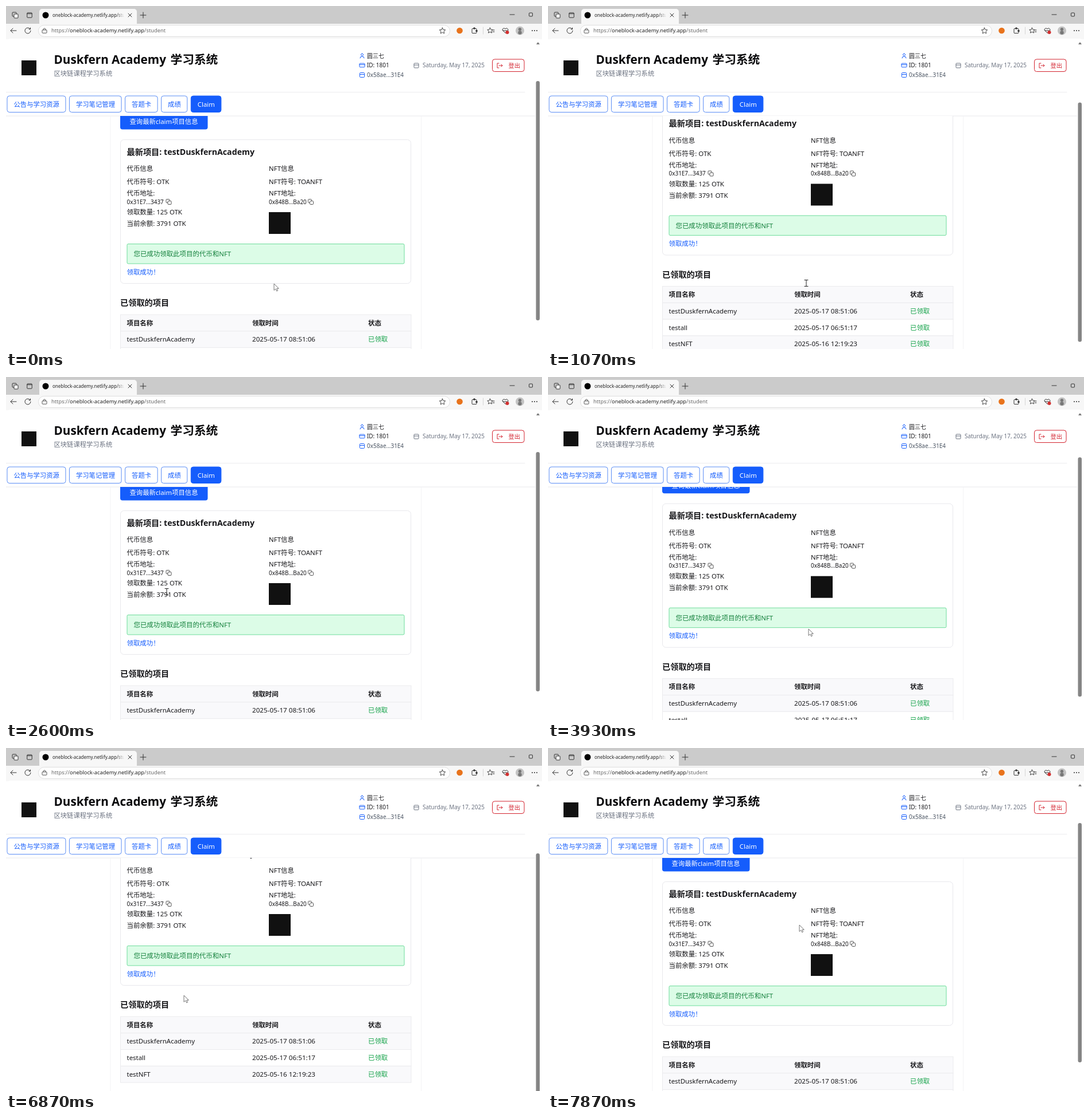
An HTML page for the animation above (8000 ms loop, 934 by 599 pixels).

```html
<!DOCTYPE html>
<html lang="zh">
<head>
<meta charset="utf-8">
<title>Student page</title>
<style>
  html, body { margin: 0; width: 100%; height: 100%; overflow: hidden; background: #fff; }
  svg { display: block; }
  text { font-family: "Noto Sans", "Noto Sans CJK SC", "Noto Sans CJK", sans-serif; white-space: pre; }
  .icon { fill: none; stroke-linecap: round; stroke-linejoin: round; }
</style>
</head>
<body>
<svg id="stage" width="934" height="599" viewBox="0 0 934 599"></svg>
<script>
const INK = '#18181b', BLUE = '#155dfc', GREY = '#6b7280', RED = '#d3232f', GREEN = '#16a34a', DARK = '#333';
const BASE = 11.45, HEAD = 14.2, SMALL = 9.95;

// y is the middle of the line
const text = (s, x, y, size = BASE, fill = INK, weight = 400) =>
  `<text x="${x}" y="${(y + size * .36).toFixed(2)}" font-size="${size}" fill="${fill}" font-weight="${weight}">${s}</text>`;
const box = (x, y, w, h, r, fill, stroke = 'none') =>
  `<rect x="${x}" y="${y}" width="${w}" height="${h}" rx="${r}" fill="${fill}" stroke="${stroke}"/>`;
const dot = (x, y, r, fill) => `<circle cx="${x}" cy="${y}" r="${r}" fill="${fill}"/>`;
const icon = (x, y, d, stroke = DARK) =>
  `<path class="icon" d="${d}" stroke="${stroke}" transform="translate(${x} ${y})"/>`;
const line = (x1, y1, x2, y2, stroke) => icon(0, 0, `M${x1} ${y1}L${x2} ${y2}`, stroke);

// Icons centred on x, y
const frame = (x, y, w, h, color = DARK, fill = 'none') => box(x - w / 2, y - h / 2, w, h, 1, fill, color);
const stacked = (x, y, size, color) =>
  frame(x - 1.5, y - 1.5, size, size, color) + frame(x + 1.5, y + 1.5, size, size, color, '#fff');
const card = (x, y, w, h, color) => frame(x, y, w, h, color) + line(x - w / 2, y - 1, x + w / 2, y - 1, color);
const person = (x, y, color) => icon(x, y, 'M-3.5 4Q-3.5 1 0 1T3.5 4M0 -4A2 2 0 1 0 .1 -4', color);
const star = (x, y, r) => icon(x, y, 'M' + Array.from({ length: 10 }, (_, i) => {
  const angle = i * Math.PI / 5, radius = i % 2 ? r * .48 : r;
  return `${(radius * Math.sin(angle)).toFixed(2)} ${(-radius * Math.cos(angle)).toFixed(2)}`;
}).join('L') + 'Z', '#444');

const browser = () => [
  box(0, 0, 934, 31, 0, '#cbcbcb'),
  box(0, 31, 934, 27, 0, '#f7f7f7'),
  box(58, 5, 170, 30, 5, '#f7f7f7'),
  stacked(16, 16, 7),
  frame(41, 16, 8.5, 8.5), line(37, 13.5, 45, 13.5, DARK),
  dot(69, 16, 5.5, '#000'),
  text('oneblock-academy.netlify.app/stu', 81, 16, 8, '#222'),
  box(192, 8, 17, 16, 0, 'url(#fade)'),
  icon(216, 16, 'M-3 -3L3 3M3 -3L-3 3'),
  icon(239, 16, 'M-5 0H5M0 -5V5'),
  icon(882, 15, 'M-4 0H4'),
  frame(914.5, 15, 6, 6),
  icon(13, 43, 'M5 0H-5M-1 -4L-5 0L-1 4'),
  icon(38, 43, 'M4 -3A5 5 0 1 0 5 0M4.5 -5V-2.5H2'),
  box(56.5, 33.5, 717, 20, 10, '#fff', '#dedede'),
  frame(67, 44.5, 8, 5.5, '#555'), icon(67, 43, 'M-2 -1V-2A2 2 0 0 1 2 -2V-1', '#555'),
  text('<tspan fill="#666">https://</tspan>oneblock-academy.netlify.app<tspan fill="#666">/student</tspan>', 79, 43, 9.3, '#222'),
  star(760.5, 43.5, 5.5),
  dot(790.5, 43, 5.3, '#e8731c'),
  frame(816, 43.5, 8, 8), dot(816, 39, 1.8, DARK), dot(820, 43.5, 1.8, DARK),
  line(831.5, 37, 831.5, 49, '#d5d5d5'),
  star(843.5, 43, 5), icon(848, 43, 'M0 -1H3M0 2H3'),
  icon(870, 43, 'M0 4L-5 -1A2.8 2.8 0 0 1 0 -3A2.8 2.8 0 0 1 5 -1ZM-4 0H4'),
  dot(873.5, 46, 3, '#d32f2f'),
  dot(895.5, 43, 7.5, '#c3c3c3'), dot(895.5, 40.7, 2.7, '#777'), dot(895.5, 46.5, 3.2, '#777'),
  ...[917, 921, 925].map(x => dot(x, 43, 1, DARK)),
].join('');

// Buttons follow each other; a Latin letter is about half as wide as a Chinese one
const nav = () => {
  let x = 1.5;
  return ['公告与学习资源', '学习笔记管理', '答题卡', '成绩', 'Claim'].map(label => {
    const active = label == 'Claim', left = x;
    const width = 23 + 11.35 * label.length * (active ? .53 : 1);
    x += width + 6;
    return box(left + .5, 157, width - .5, 28.5, 4, active ? BLUE : '#fff', active ? BLUE : '#5a8df5') +
      text(label, left + 12, 171.5, 11.35, active ? '#fff' : BLUE);
  }).join('');
};

const header = () => [
  box(2, 57, 930, 135, 5, '#fff'),
  box(27, 95, 26, 26, 0, '#111'),
  text('Duskfern Academy', 83.5, 94, 20.7, '#09090b', 700),
  text('学习系统', 286.5, 94, 20.7, '#09090b', 700),
  text('区块链课程学习系统', 83.5, 118, 11.3, GREY),
  person(620.5, 87, BLUE), card(620.5, 103.5, 9, 6.5, BLUE), card(620.5, 120.5, 8, 8, BLUE),
  ...['圆三七', 'ID: 1801', '0x58ae...31E4'].map((s, i) => text(s, 629, 87 + 16.8 * i, SMALL, i < 2 ? INK : '#4b5563')),
  card(715, 104, 8, 8, GREY),
  text('Saturday, May 17, 2025', 726, 103.5, SMALL, GREY),
  box(847.5, 93, 55.5, 21.5, 4, '#fff', RED),
  icon(860, 104, 'M-1 -4H-4V4H-1M-1 0H5M3 -2L5 0L3 2', RED),
  text('登出', 875.5, 104, 10.2, RED, 500),
  line(0, 150.5, 904, 150.5, '#ececef'),
  nav(),
  line(0, 192, 922, 192, '#e8e8ec'),
].join('');

const infoColumn = (x, kind, symbol, address) => [
  text(kind + '信息', x, 284),
  text(`${kind}符号: ${symbol}`, x, 307),
  text(kind + '地址:', x, 327),
  text(address, x, 342, SMALL),
  stacked(x + 73, 342, 6, '#555'),
].join('');

const tableRow = (cells, i) => {
  const y = 539 + i * 28.8;
  return box(199.5, y, 506.5, 28.8, 0, i == 2 ? '#fff' : '#f9f9fb', '#ebebee') +
    cells.map((s, column) => text(s, [210.5, 429, 631][column], y + 14.4, i && column == 1 ? 11.65 : BASE,
      i && column == 2 ? GREEN : INK, i ? 400 : 700)).join('');
};

const content = () => [
  ...[182, 723.5].map(x => line(x, 150, x, 700, '#f3f3f5')),
  box(199, 188, 152.5, 27.5, 4, BLUE),
  text('查询最新claim项目信息', 215.5, 202, 11.35, '#fff'),
  box(199.5, 233.5, 506, 251, 6, '#fff', '#e8e8ec'),
  text('最新项目: testDuskfernAcademy', 210.5, 254.5, HEAD, INK, 700),
  infoColumn(210.5, '代币', 'OTK', '0x31E7...3437'),
  infoColumn(458, 'NFT', 'TOANFT', '0x848B...Ba20'),
  text('领取数量: 125 OTK', 210.5, 360),
  text('当前余额: 3791 OTK', 210.5, 380),
  box(458, 360, 38, 38, 0, '#111'),
  box(211, 415.5, 483, 34.5, 2, '#dcfce7', '#6fdc9c'),
  text('您已成功领取此项目的代币和NFT', 222.5, 433, BASE, '#15803d'),
  text('领取成功！', 210.5, 464.5, BASE, BLUE),
  text('已领取的项目', 199, 518, HEAD, INK, 700),
  ...[['项目名称', '领取时间', '状态'],
    ['testDuskfernAcademy', '2025-05-17 08:51:06', '已领取'],
    ['testall', '2025-05-17 06:51:17', '已领取'],
    ['testNFT', '2025-05-16 12:19:23', '已领取']].map(tableRow),
].join('');

const stage = document.getElementById('stage');
stage.innerHTML = `
  <defs><linearGradient id="fade">
    <stop stop-color="#f7f7f7" stop-opacity="0"/><stop offset=".85" stop-color="#f7f7f7"/>
  </linearGradient></defs>
  ${browser()}${header()}
  <svg y="192" width="934" height="407"><g id="page">${content()}</g></svg>
  <path d="M924 67L927 63L930 67Z" fill="#777"/>
  <rect id="thumb" x="923.5" width="6.5" height="418" rx="3.2" fill="#858585"/>
  <path id="arrow" d="M0 0V11.5L2.8 9L4.8 13L6.6 12L4.8 8.3H8.3Z" fill="#fff" stroke="#666" stroke-width=".9"/>
  <path id="beam" class="icon" d="M-3 -5.5H3M0 -5.5V5.5M-3 5.5H3" stroke="#222"/>`;
const [page, thumb, arrow, beam] = ['page', 'thumb', 'arrow', 'beam'].map(id => document.getElementById(id));

const LOOP = 8000, REFRESH = 1000 / 15;
// Each move starts at a time and glides to a new place
const wheelMoves = [[0, 0], [400, 70], [860, 49.5], [1200, 0], [3730, 12.3], [4060, 70], [7340, 0]];
const pointerMoves = [[0, 467, 485], [130, 450, 484], [1870, 280, 375], [3300, 454, 440],
  [4130, 316, 486], [5200, 450, 525], [6330, 310, 432], [7270, 438, 309]];

function glide(moves, t, duration, axis = 1) {
  return moves.reduce((value, move) => {
    const p = Math.min(1, Math.max(0, (t - move[0]) / duration));
    return value + (move[axis] - value) * p * p * (3 - 2 * p);
  }, moves[0][axis]);
}

function draw() {
  const t = Math.floor((performance.now() % LOOP + 5) / REFRESH) * REFRESH;
  const scroll = glide(wheelMoves, t, 200);
  const place = [1, 2].map(axis => glide(pointerMoves, t, 500, axis));
  // The pointer turns into a text beam over text
  const overText = t > 800 && t < 1900 || t > 2200 && t < 3300;
  page.setAttribute('transform', `translate(0 ${-192 - scroll})`);
  thumb.setAttribute('y', 131 + scroll * .757);
  for (const [shape, shown] of [[arrow, !overText], [beam, overText]]) {
    shape.setAttribute('transform', `translate(${place})`);
    shape.setAttribute('visibility', shown ? 'visible' : 'hidden');
  }
  requestAnimationFrame(draw);
}
draw();
</script>
</body>
</html>
```
